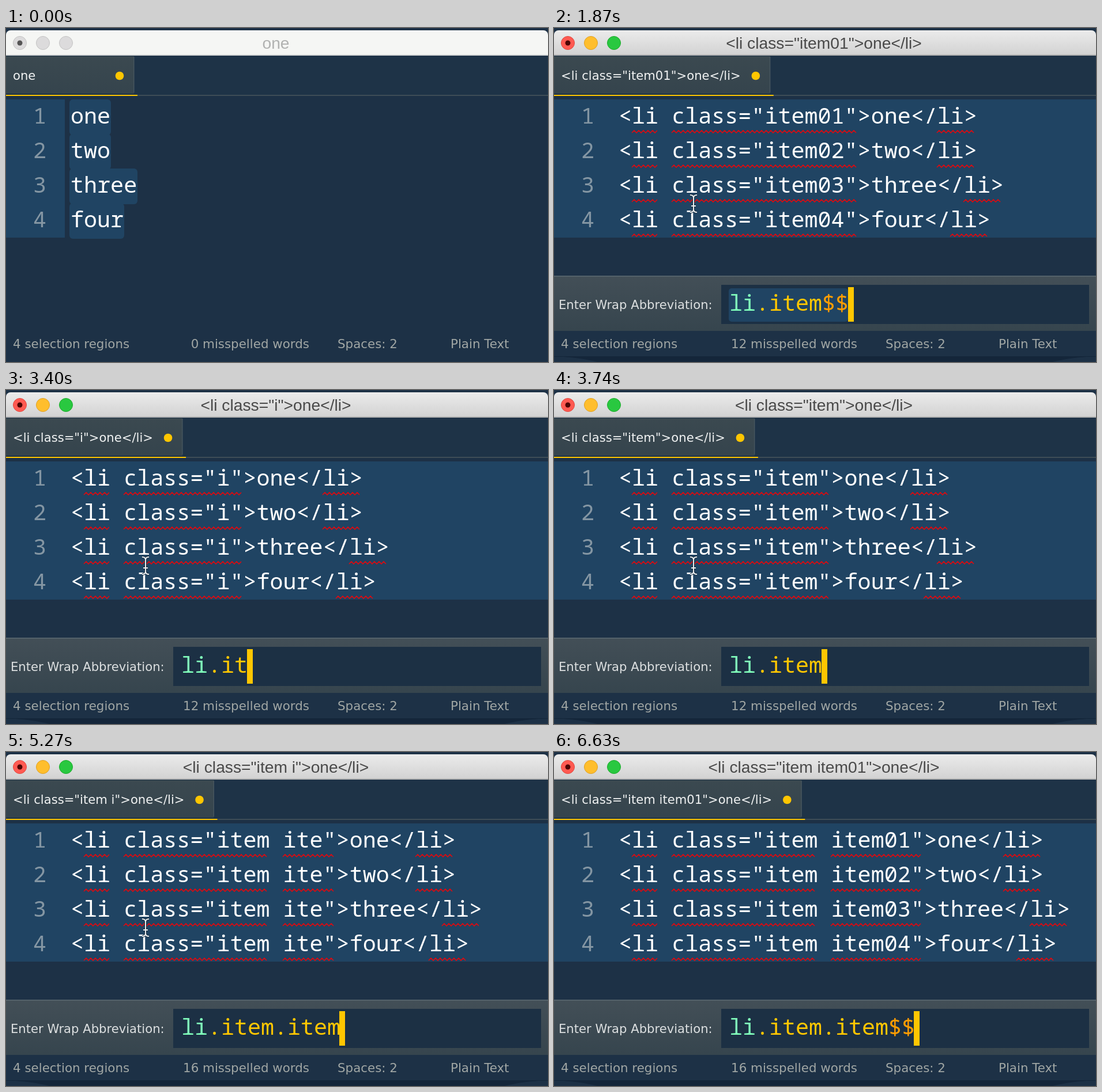
These frames come from a looping animation (940 by 580 pixels, 6.8 s). An HTML page with a canvas:

```html
<!DOCTYPE html>
<html>
<head>
<meta charset="utf-8">
<style>
  html, body { margin: 0; overflow: hidden; background: #1d3146; }
  canvas { display: block; }
</style>
</head>
<body>
<canvas id="stage" width="940" height="580"></canvas>
<script>
const ctx = document.getElementById('stage').getContext('2d');
const LOOP = 6800, COL = 23, LEFT = 112, TOP = 124, ROW = 60;
const WORDS = ['one', 'two', 'three', 'four'];
const CODE = '500 38.4px "Noto Sans Mono", monospace';
const LABEL = '21.15px "DejaVu Sans", sans-serif';
const STATUS = '21.4px "DejaVu Sans", sans-serif';
const TITLE = '28.25px "Liberation Sans", Arial, sans-serif';
const BG = '#1d3146', SELECTED = '#204463', YELLOW = '#ffc600';

// time, typed abbreviation, class in the lines, class in tab and title (it may lag)
const TYPING = [
  [1870, 'li.item$$', 'item$$'],
  [2720, 'li', null],
  [3060, 'li.', ''],
  [3400, 'li.it', 'i'],
  [3570, 'li.item', 'ite', 'it'],
  [3740, 'li.item', 'item'],
  [4760, 'li.item.', 'item '],
  [5100, 'li.item.it', 'item i', 'item '],
  [5270, 'li.item.item', 'item ite', 'item i'],
  [5440, 'li.item.item', 'item item'],
  [5780, 'li.item.item$', 'item item'],
  [5950, 'li.item.item$$', 'item item$$', 'item item$'],
  [6120, 'li.item.item$$', 'item item$$']
];

const POINTER = [
  [170, arrow, 317, 372], [340, arrow, 317, 352], [680, arrow, 235, 295],
  [850, arrow, 239, 295], [1870, beam, 242, 305], [3060, arrow, 241, 300],
  [3230, beam, 242, 305], [5440, arrow, 241, 300], [5610, beam, 242, 305],
  [6290, beam, 600, 387], [6460, resize, 712, 420], [6630]
];

const current = (steps, t) => steps.filter(step => step[0] <= t).pop();

function rect(x, y, w, h, fill, radius = 0) {
  ctx.fillStyle = fill;
  ctx.beginPath();
  ctx.roundRect(x, y, w, h, radius);
  ctx.fill();
}

function disc(x, y, r, fill, edge) {
  ctx.beginPath();
  ctx.arc(x, y, r, 0, 7);
  ctx.fillStyle = fill;
  ctx.fill();
  if (edge) {
    ctx.strokeStyle = edge;
    ctx.lineWidth = 1;
    ctx.stroke();
  }
}

function text(str, x, y, font, fill, align = 'left') {
  ctx.font = font;
  ctx.fillStyle = fill;
  ctx.textAlign = align;
  ctx.fillText(str, x, y);
}

function shade(y1, y2, from, to) {
  const g = ctx.createLinearGradient(0, y1, 0, y2);
  g.addColorStop(0, from);
  g.addColorStop(1, to);
  return g;
}

function wrap(word, cls, index) {
  if (cls === null) return `<li>${word}</li>`;
  const name = cls.replace(/\$+/, run => String(index).padStart(run.length, '0'));
  return `<li class="${name}">${word}</li>`;
}

const misspelled = line => [...line.matchAll(/\bli\b>?|class="\w+"?|\bite"|item\d+"/g)];

function squiggle(x, y, w) {
  ctx.beginPath();
  for (let i = 0; i * 4 <= w; i++) ctx.lineTo(x + i * 4, y + (i % 2 ? -2 : 2));
  ctx.strokeStyle = '#dd0a10';
  ctx.lineWidth = 1.6;
  ctx.stroke();
}

function titleBar(active, title) {
  rect(0, 4, 940, 43, active ? shade(4, 47, '#ebebeb', '#d2d2d2') : '#f5f6f4', [8, 8, 0, 0]);
  rect(0, 46, 940, 2, active ? '#b3b3b3' : '#d6d8d8');
  const lights = active
    ? [['#ff5a52', '#e0483f'], ['#ffbe2d', '#dfa023'], ['#29c840', '#1aab29']]
    : Array(3).fill(['#dcdbdc', '#c3c3c3']);
  lights.forEach(([fill, edge], i) => disc(24 + i * 40, 26, 11.5, fill, edge));
  disc(24, 26, 4.5, active ? '#4d0504' : '#555');
  text(title, 468, 36, TITLE, active ? '#4a4a4a' : '#b1b2b1', 'center');
}

function tabBar(title) {
  ctx.font = LABEL;
  const width = Math.max(222, 63 + ctx.measureText(title).width);
  rect(0, 48, 940, 70, '#1e3347');
  rect(0, 49, width, 65, shade(49, 114, '#3b4950', '#35444d'));
  rect(width - 1, 50, 1.5, 62, '#47565f');
  rect(0, 116, 940, 2, '#3e4d57');
  rect(0, 116, width + 6, 2, YELLOW);
  text(title, 12, 90, LABEL, '#f0f2f2');
  disc(width - 25, 83, 7.3, YELLOW);
}

function plainLines(active) {
  rect(0, TOP, 102, 4 * ROW, SELECTED);
  WORDS.forEach((word, i) => {
    const y = TOP + i * ROW, end = LEFT + word.length * COL + 1;
    if (active) rect(110, y + 2, end - 111, 58, SELECTED, 5);
    else rect(110, y, end - 110, 62, SELECTED, 6);
  });
}

function codeLines(lines) {
  lines.forEach((line, i) => {
    const y = TOP + i * ROW + 42;
    text(i + 1, 47, y, CODE, '#8496a3');
    text(line, LEFT, y, CODE, '#fff');
    for (const m of misspelled(line)) {
      squiggle(LEFT + m.index * COL, y + 14, m[0].length * COL - 2);
    }
  });
}

function panel(typed, selected) {
  rect(0, 430, 940, 96, shade(430, 526, '#434f57', '#36454e'));
  rect(0, 430, 940, 2, '#53616a');
  rect(290, 446, 638, 68, '#1c3044');
  // the caret sits on whole points of a double-density screen
  const caret = 2 * Math.round((303 + typed.length * 22.95) / 2);
  if (selected) rect(303, 452, caret - 303, 58, SELECTED, 5);
  [...typed].forEach((ch, i) => {
    const trailingDot = ch === '.' && i === typed.length - 1;
    const color = i < 2 ? '#80ffbb' : ch === '$' ? '#ff9d00' : trailingDot ? '#fff' : YELLOW;
    text(ch, 304 + i * COL, 491, CODE, color);
  });
  rect(caret, 450, 10, 60, YELLOW);
  text('Enter Wrap Abbreviation:', 8, 488, LABEL, '#dcdfe0');
}

function statusBar(active, count) {
  const color = '#a0a6a4';
  text('4 selection regions', 12, 556, STATUS, color);
  text(count + ' misspelled words', 526, 556, STATUS, color, 'right');
  text('Spaces: 2', 575, 556, STATUS, color);
  text('Plain Text', 771, 556, STATUS, color);
  if (!active) return;
  rect(0, 570, 940, 1, '#14263a');
  ctx.fillStyle = '#14263a';
  ctx.fill(new Path2D('M0 570Q45 572 75 580H865Q895 572 940 570Z'));
}

function polygon(points) {
  ctx.beginPath();
  points.forEach(p => ctx.lineTo(...p));
  ctx.closePath();
  ctx.fillStyle = '#0b0b0b';
  ctx.strokeStyle = '#fff';
  ctx.lineWidth = 2;
  ctx.lineJoin = 'round';
  ctx.stroke();
  ctx.fill();
}

function arrow() {
  polygon([[1, 2], [1, 29], [7.5, 23.5], [12, 34.5], [17, 32], [12.5, 22], [21, 22]]);
}

function beam() {
  const path = new Path2D('M-6-15Q0-15 0-10V10Q0 15-6 15M6-15Q0-15 0-10M0 10Q0 15 6 15M-4 4H4');
  for (const [color, width] of [['#1b2c3c', 4], ['#e8eef2', 2]]) {
    ctx.strokeStyle = color;
    ctx.lineWidth = width;
    ctx.stroke(path);
  }
}

function resize() {
  polygon([[-18, 0], [-9, -8], [-9, -3], [-3, -3], [-3, -11], [3, -11], [3, -3], [9, -3], [9, -8],
    [18, 0], [9, 8], [9, 3], [3, 3], [3, 11], [-3, 11], [-3, 3], [-9, 3], [-9, 8]]);
}

function draw(t) {
  const active = t >= 340;
  const [, typed, cls, tabCls = cls] = current(TYPING, t) || [];
  const wrapped = typed !== undefined;
  const lines = wrapped ? WORDS.map((word, i) => wrap(word, cls, i + 1)) : WORDS;
  const title = wrapped ? wrap('one', tabCls, 1) : 'one';

  rect(0, 0, 940, 580, BG);
  titleBar(active, title);
  tabBar(title);
  if (wrapped) rect(0, TOP, 940, 4 * ROW, SELECTED);
  else plainLines(active);
  codeLines(lines);
  if (wrapped) panel(typed, t < 2720);
  else if (active) rect(110, TOP, 10, 242, YELLOW);
  statusBar(active, lines.flatMap(misspelled).length);

  const [, shape, x, y] = current(POINTER, t) || [];
  if (shape) {
    ctx.save();
    ctx.translate(x, y);
    shape();
    ctx.restore();
  }
}

const start = performance.now();
function tick() {
  draw((performance.now() - start) % LOOP);
  requestAnimationFrame(tick);
}
tick();
</script>
</body>
</html>
```
